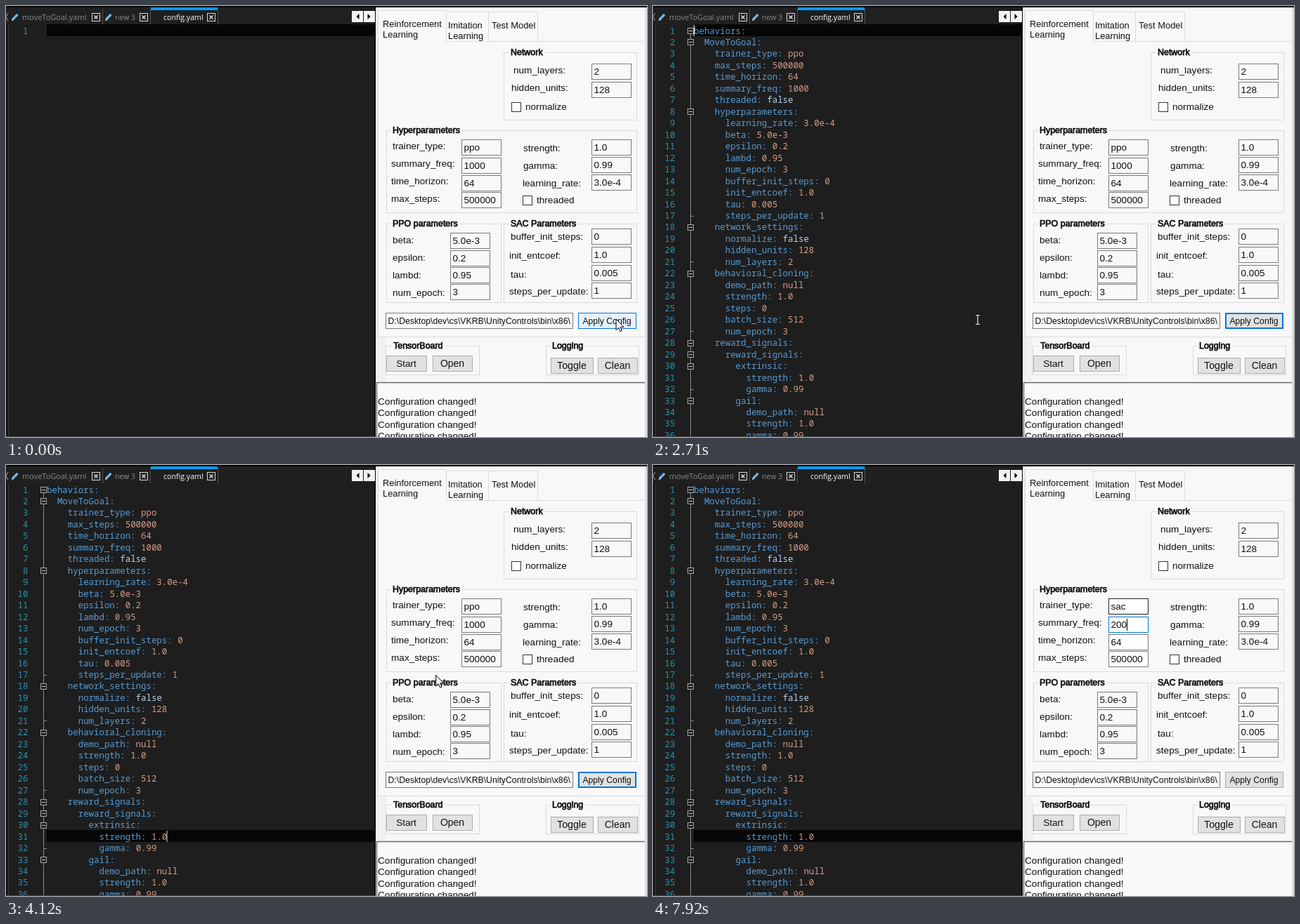
These frames come from a looping animation (912 px wide and 614 px high, 8 s). An HTML page:

```html
<!DOCTYPE html>
<html lang="en">
<head>
<meta charset="utf-8">
<title>Config editor</title>
<style>
  html, body { margin: 0; width: 100%; height: 100%; overflow: hidden; background: #1e1e1e; }
  svg { display: block; width: 912px; height: 614px; }
  text { white-space: pre; }
  .ui { font-family: "Liberation Sans", Arial, sans-serif; }
  .code { font: 12.42px "Noto Sans Mono", monospace; }
  .tab { font-family: "Open Sans", sans-serif; }
</style>
</head>
<body>
<svg id="stage" viewBox="0 0 912 614"></svg>
<script>
const LOOP = 8000, BLUE = '#0078d7', PANEL = '#f8f8f8', DARK = '#1e1e1e';
const stage = document.getElementById('stage');

function add(parent, tag, attrs = {}, content) {
  const el = document.createElementNS('http://www.w3.org/2000/svg', tag);
  for (const k in attrs) el.setAttribute(k, attrs[k]);
  if (content !== undefined) el.textContent = content;
  parent.appendChild(el);
  return el;
}
const set = (el, attrs) => { for (const k in attrs) el.setAttribute(k, attrs[k]); };
const show = (el, on) => el.setAttribute('visibility', on ? 'visible' : 'hidden');
const group = (parent = stage) => add(parent, 'g');
const rect = (g, x, y, w, h, fill) => add(g, 'rect', { x, y, width: w, height: h, fill });
// Crisp 1px frame from (x, y) to (x2, y2)
const frame = (g, x, y, x2, y2, fill, stroke) =>
  add(g, 'rect', { x: x + .5, y: y + .5, width: x2 - x - 1, height: y2 - y - 1, fill, stroke });
const path = (g, d, stroke, width = 1, fill = 'none') =>
  add(g, 'path', { d, stroke, fill, 'stroke-width': width });
// y is the middle of the line
const label = (g, s, x, y, size = 13.6, attrs = {}) =>
  add(g, 'text', { class: 'ui', x, y: y + 4.2, 'font-size': size, fill: '#111', ...attrs }, s);

/* ---------- editor ---------- */
const editor = group();
rect(editor, 0, 0, 526, 614, DARK);
rect(editor, 0, 0, 526, 2, '#080808');
rect(editor, 0, 26, 3, 588, '#161616');
rect(editor, 3, 26, 1, 588, '#3a3a3a');
rect(editor, 524, 0, 2, 614, '#0a0a0a');

const ROW = 16.47, COL = 7.452;
const rowY = n => 35 + (n - 1) * ROW;
const mark = rect(editor, 58, 26, 466, 17, '#060606');

rect(editor, 4, 2, 520, 24, '#202020');
rect(editor, 206, 2, 95, 24, DARK);
rect(editor, 206, 2, 95, 4, '#0a9af0');
for (const x of [137, 205, 301]) rect(editor, x, 4, 1, 22, '#505050');
path(editor, 'M3 10L0 15.5L3 21', '#aaa');
[['moveToGoal.yaml', 23, 11, '#8a8a8a'], ['new 3', 155, 10.5, '#8a8a8a'], ['config.yaml', 224, 10.6, '#fff']]
  .forEach(([s, x, size, fill]) => add(editor, 'text', { class: 'tab', x, y: 20, 'font-size': size, fill }, s));
for (const x of [8, 141]) {
  path(editor, `M${x + 2} 18.5L${x + 8.5} 12`, '#6db3e4', 3.4);
  path(editor, `M${x} 21L${x + 1} 17.5L${x + 3.5} 20Z`, 'none', 0, '#cfe6f7');
}
for (const x of [122, 190, 286]) {
  frame(editor, x, 10, x + 12, 22, 'none', '#d8d8d8');
  path(editor, `M${x + 3.5} 13.5l5 5m0-5l-5 5`, '#eee', 1.2);
}
for (const [x, d] of [[492, -1], [509, 1]]) {
  rect(editor, x, 7, 16, 16, '#f2f2f2');
  path(editor, `M${x + 8 - 2.5 * d} 11l${4 * d} 4l${-4 * d} 4Z`, 'none', 0, '#000');
}

const yaml = `behaviors:
  MoveToGoal:
    trainer_type: ppo
    max_steps: 500000
    time_horizon: 64
    summary_freq: 1000
    threaded: false
    hyperparameters:
      learning_rate: 3.0e-4
      beta: 5.0e-3
      epsilon: 0.2
      lambd: 0.95
      num_epoch: 3
      buffer_init_steps: 0
      init_entcoef: 1.0
      tau: 0.005
      steps_per_update: 1
    network_settings:
      normalize: false
      hidden_units: 128
      num_layers: 2
    behavioral_cloning:
      demo_path: null
      strength: 1.0
      steps: 0
      batch_size: 512
      num_epoch: 3
    reward_signals:
      reward_signals:
        extrinsic:
          strength: 1.0
          gamma: 0.99
        gail:
          demo_path: null
          strength: 1.0
          gamma: 0.99`.split('\n');

const lineNo = (g, n) =>
  add(g, 'text', { class: 'code', x: 31.5, y: rowY(n) + 4.5, 'text-anchor': 'end', fill: '#2b91af' }, n);
lineNo(editor, 1);
const doc = group(editor);
path(doc, 'M53.5 35V614', '#8a8a8a');
yaml.forEach((line, i) => {
  const n = i + 1, y = rowY(n);
  if (n > 1) lineNo(doc, n);
  const indent = line.search(/\S/);
  const [key, value] = line.trim().split(' ');
  const row = add(doc, 'text', { class: 'code', x: 58 + indent * COL, y: y + 4.5, fill: '#569cd6' }, key);
  if (value) add(row, 'tspan', { fill: value === 'false' ? '#b5d3f2' : '#d69d85' }, ' ' + value);
  const top = Math.round(y) - 4;
  if (!value) {
    frame(doc, 49, top, 58, top + 9, DARK, '#a8a8a8');
    path(doc, `M51 ${top + 4.5}h5`, '#ccc');
  } else if ([17, 21, 27, 32].includes(n)) {
    path(doc, `M53 ${top + 4.5}h5`, '#8a8a8a');
  }
});
const docCaret = rect(editor, 58, 27, 1, 16, '#ddd');
rect(editor, 0, 613, 526, 1, '#4a4a4a');

/* ---------- form ---------- */
const form = group();
rect(form, 526, 0, 386, 614, PANEL);
rect(form, 526, 0, 386, 2, '#0a0a0a');
rect(form, 909, 2, 3, 612, '#dedede');
rect(form, 526, 2, 3, 534, '#ececec');
rect(form, 529, 472, 11, 63, '#f0f0f0');
path(form, 'M529.5 471V6.5H626.5V50.5H908.5M626.5 8.5H756.5V50M686.5 9V50M529 471.5H909', '#dcdcdc');
[['Reinforcement', 536, 26], ['Learning', 536, 41], ['Imitation', 629, 28], ['Learning', 629, 43],
 ['Test Model', 691, 28]].forEach(([s, x, y]) => label(form, s, x, y, 12.9));

function box(title, tx, x, y, x2, y2) {
  frame(form, x, y, x2, y2, 'none', '#dadada');
  const t = label(form, title, tx, y, 12.45, { stroke: '#111', 'stroke-width': .75 });
  const w = t.getComputedTextLength();
  form.insertBefore(rect(form, tx - 2, y - 2, w + 4, 5, PANEL), t);
}
box('Network', 718, 708, 66, 898, 163);
box('Hyperparameters', 550, 541, 177, 898, 295);
box('PPO parameters', 550, 541, 310, 705, 423);
box('SAC Parameters', 718, 708, 310, 898, 423);
box('TensorBoard', 551, 540, 484, 674, 526);
box('Logging', 777, 768, 484, 901, 526);

function field(x, y, value, w = 57) {
  const edge = frame(form, x, y, x + w, y + 23, PANEL, '#7a7a7a');
  const sel = rect(form, x + 3, y + 3, 25, 18, BLUE);
  const text = label(form, value, x + 3.5, y + 12);
  const caret = rect(form, 0, y + 3, 1, 17, '#000');
  show(sel, false);
  show(caret, false);
  return { x, edge, sel, text, caret };
}
const fields = {};
[['num_layers:', 722, 92, 833, 82, '2'], ['hidden_units:', 719, 117, 833, 108, '128'],
 ['trainer_type:', 550, 200, 648, 190, 'ppo'], ['summary_freq:', 548, 225, 648, 216, '1000'],
 ['time_horizon:', 548, 250, 648, 241, '64'], ['max_steps:', 548, 275, 648, 265, '500000'],
 ['strength:', 736, 203, 833, 190, '1.0'], ['gamma:', 736, 228, 833, 215, '0.99'],
 ['learning_rate:', 735, 253, 833, 240, '3.0e-4'],
 ['beta:', 550, 334, 632, 323, '5.0e-3'], ['epsilon:', 550, 359, 632, 348, '0.2'],
 ['lambd:', 550, 384, 632, 372, '0.95'], ['num_epoch:', 550, 409, 632, 396, '3'],
 ['buffer_init_steps:', 718, 329, 833, 317, '0'], ['init_entcoef:', 716, 356, 833, 343, '1.0'],
 ['tau:', 718, 383, 833, 369, '0.005'], ['steps_per_update:', 716, 407, 833, 394, '1']
].forEach(([name, lx, ly, x, y, value]) => {
  label(form, name, lx, ly);
  fields[name.slice(0, -1)] = field(x, y, value);
});
for (const [s, x, y] of [['normalize', 719, 144], ['threaded', 735, 277]]) {
  frame(form, x, y - 7, x + 14, y + 7, '#fff', '#333');
  label(form, s, x + 20, y);
}
set(field(540, 437, 'D:\\Desktop\\dev\\cs\\VKRB\\UnityControls\\bin\\x86\\', 267).text, { 'font-size': 12.25 });

function button(s, x, y, x2, size) {
  const edge = frame(form, x, y, x2, y + 23, '#e1e1e1', '#adadad');
  label(form, s, (x + x2) / 2 - .5, y + 11.5, size, { 'text-anchor': 'middle' });
  return edge;
}
button('Start', 541, 498, 599, 13.6);
button('Open', 607, 498, 664, 14);
button('Toggle', 775, 501, 836, 14.2);
button('Clean', 842, 501, 899, 14);
const apply = button('Apply Config', 814, 437, 897, 12.2);
const focusRing = frame(form, 815, 438, 896, 459, 'none', BLUE);
const dots = frame(form, 817, 440, 894, 457, 'none', '#222');
set(dots, { 'stroke-dasharray': '1 1' });

rect(form, 527, 536, 382, 78, '#f9f9f9');
path(form, 'M527.5 614V536.5H909', '#696969', 1.5);
for (let i = 0; i < 4; i++) label(form, 'Configuration changed!', 529, 563.5 + i * 16.45);

/* ---------- pointer ---------- */
const arrow = path(stage, 'M0 0V15.5L3.6 12.2L6 17.6L8.4 16.5L6.1 11.3H11Z', '#000', 1, '#fff');
const beam = path(stage, 'M-3 -6.5H-1L0 -5.5L1 -6.5H3M0 -5.5V5.5M-3 6.5H-1L0 5.5L1 6.5H3', '#fff', 1.2);
const ring = add(stage, 'circle', { cx: 453, cy: 529, r: 7.3, fill: 'none', stroke: '#f0f0f0', 'stroke-width': 1.3 });

/* ---------- timeline ---------- */
// start, end, steps, from x/y, to x/y
const moves = [
  [0, 1, 1, 868, 446, 868, 446],
  [2180, 2600, 8, 857, 444, 462, 447],
  [2950, 3190, 5, 462, 447, 453, 529],
  [3680, 4350, 14, 453, 529, 677, 205]
];
const last = (table, t) => table.filter(r => r[0] <= t).pop();

function pointer(t) {
  const [a, b, n, x, y, x2, y2] = last(moves, t);
  const k = Math.min(1, Math.floor((t - a) / (b - a) * n) / n);
  const e = k * k * (3 - 2 * k);
  return [x + (x2 - x) * e, y + (y2 - y) * e];
}

// time, text, state
const typing = {
  trainer_type: [[0, 'ppo', ''], [4410, 'ppo', 'caret'], [4640, 'ppo', 'all'], [5330, 's', 'caret'],
    [5450, 'sa', 'caret'], [5630, 'sac', 'caret'], [5810, 'sac', 'hover']],
  summary_freq: [[0, '1000', ''], [5810, '1000', 'all'], [6060, '1000', 'caret'], [6510, '100', 'caret'],
    [7130, '10', 'caret'], [7190, '', 'caret'], [7430, '2', 'caret'], [7740, '20', 'caret'], [7920, '200', 'caret']]
};
const white = ['trainer_type', 'summary_freq', 'time_horizon', 'max_steps'];

function drawField(name, t) {
  const f = fields[name], [, text, state] = last(typing[name], t);
  if (f.text.textContent !== text) f.text.textContent = text;
  const w = text ? f.text.getComputedTextLength() : 0;
  const all = state === 'all';
  set(f.text, { fill: all ? '#fff' : '#111' });
  set(f.edge, { stroke: state === 'hover' ? '#222' : state ? BLUE : '#7a7a7a' });
  set(f.sel, { width: w + 2 });
  set(f.caret, { x: f.x + 3.5 + Math.round(w) - .5 });
  show(f.sel, all);
  show(f.caret, state === 'caret');
}

function draw(t) {
  const loaded = t >= 2650, clicked = t >= 3270;
  show(doc, loaded);
  set(mark, { y: clicked ? 520 : 26 });
  set(docCaret, clicked ? { x: 228.5, y: 521 } : { x: 58, y: 27 });
  show(docCaret, loaded && t < 4410);

  const [x, y] = pointer(t);
  const over = x > 814 && x < 897 && y > 437 && y < 460;
  const pressed = t >= 1170 && t < 1320;
  const focused = t >= 1170 && t < 4410;
  set(apply, {
    fill: pressed ? '#cce4f7' : over ? '#e5f1fb' : '#e1e1e1',
    stroke: pressed ? '#005499' : over || focused ? BLUE : '#adadad'
  });
  show(focusRing, focused && !pressed);
  show(dots, focused && t < 2650);

  for (const name of white) set(fields[name].edge, { fill: t >= 4500 ? '#fff' : PANEL });
  for (const name in typing) drawField(name, t);

  const inEditor = x < 524;
  const inField = (x > 540 && x < 807 && y > 437 && y < 460) || (x > 648 && x < 705 && y > 190 && y < 289);
  const visible = t < 5330;
  show(beam, visible && (inEditor || inField));
  show(arrow, visible && !inEditor && !inField);
  set(beam, { transform: `translate(${x} ${y})`, stroke: inEditor ? '#e8e8e8' : '#111' });
  set(arrow, { transform: `translate(${x} ${y})` });
  show(ring, t >= 3270 && t < 3370);
}

const start = performance.now();
function tick() {
  draw((performance.now() - start) % LOOP);
  requestAnimationFrame(tick);
}
tick();
</script>
</body>
</html>
```
